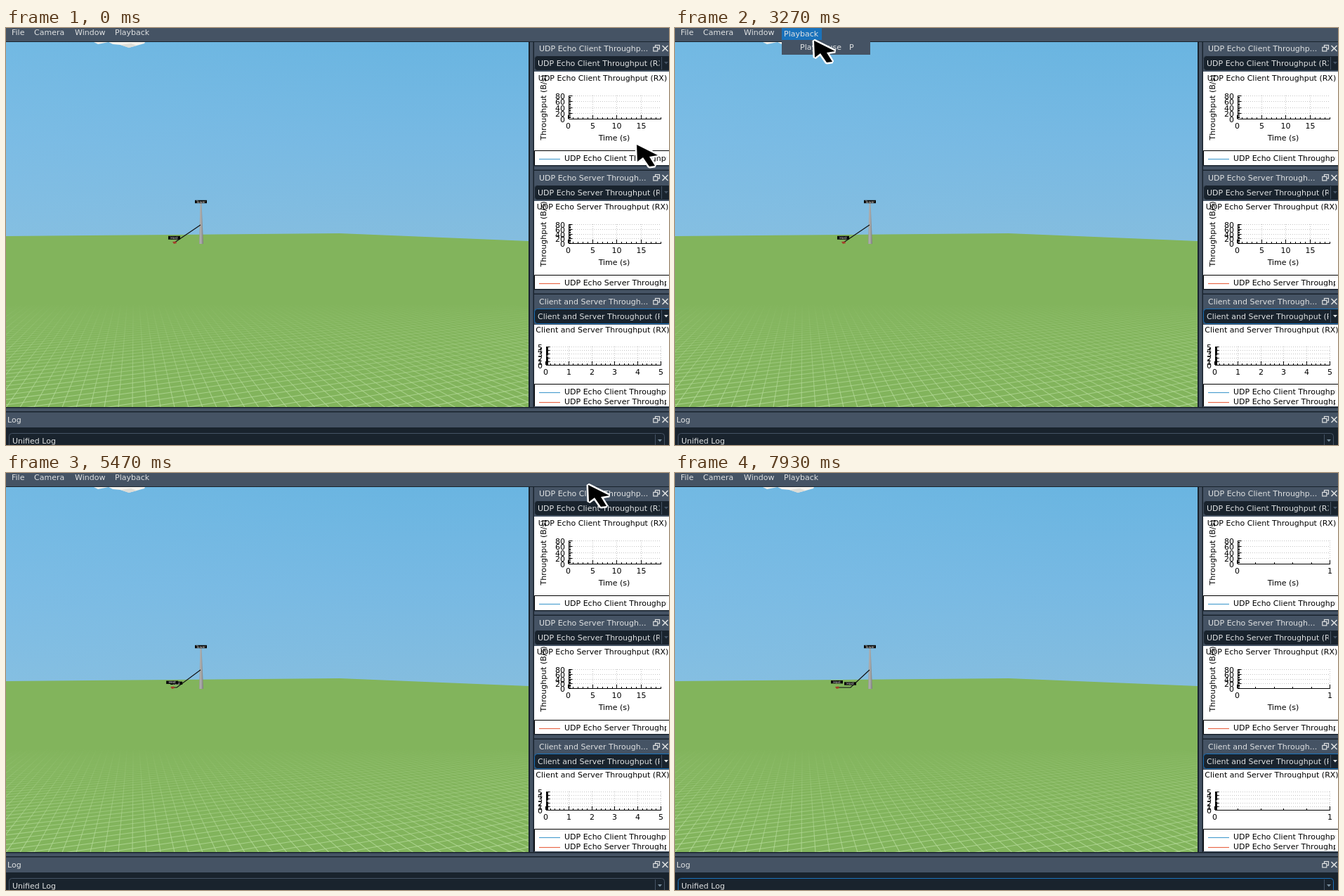
Animation, 944 px wide and 593 px high, one loop 8000 ms. Source, as an HTML page with a canvas:

```html
<!DOCTYPE html>
<html lang="en">
<head>
<meta charset="utf-8">
<title>Network simulation playback</title>
<style>
html, body { margin: 0; width: 100%; height: 100%; overflow: hidden; background: #455364; }
canvas { display: block; }
</style>
</head>
<body>
<canvas id="stage" width="944" height="593"></canvas>
<script>
const PANEL = '#455364', DARK = '#19232d', BLUE = '#1a72bb', LIGHT = '#dfe1e2', DIM = '#788d9c';
const LOOP = 8000, STEP = 200 / 3;
const view = document.getElementById('stage').getContext('2d');
let c = view;

function rect(x, y, w, h, color) {
  c.fillStyle = color;
  c.fillRect(x, y, w, h);
}

function text(s, x, y, color = '#000', align = 'left', size = 11) {
  c.font = size + 'px "DejaVu Sans", sans-serif';
  c.textAlign = align;
  c.fillStyle = color;
  c.fillText(s, x, y);
}

function path(points, close) {
  c.beginPath();
  points.forEach(([x, y]) => c.lineTo(x, y));
  if (close) c.closePath();
}

function poly(points, color) {
  path(points, true);
  c.fillStyle = color;
  c.fill();
}

function line(points, color, width = 1) {
  path(points);
  c.strokeStyle = color;
  c.lineWidth = width;
  c.stroke();
}

function clipped(x, y, w, h, paint) {
  c.save();
  c.beginPath();
  c.rect(x, y, w, h);
  c.clip();
  paint();
  c.restore();
}

function fade(y0, y1, ...colors) {
  const g = c.createLinearGradient(0, y0, 0, y1);
  colors.forEach((color, i) => g.addColorStop(i / (colors.length - 1), color));
  return g;
}

// Ground lines that meet at one vanishing point, evenly spaced along the lower edge
function fan(vx, from, to, gap) {
  const color = fade(392, 539, 'rgba(178,216,150,0)', 'rgba(178,216,150,.42)', 'rgba(178,216,150,.85)');
  for (let x = from; x < to; x += gap) line([[vx, 279.5], [x, 539.5]], color, 1.1);
}

function scene() {
  rect(0, 20, 744, 290, fade(20, 300, '#6ab5e1', '#77b9e3', '#84bddf'));
  const side = c.createLinearGradient(0, 0, 744, 0);
  side.addColorStop(0, 'rgba(135,195,232,.28)');
  side.addColorStop(.75, 'rgba(135,195,232,0)');
  rect(0, 20, 744, 290, side);
  poly([[125, 20], [131, 23], [146, 20], [152, 23], [163, 24], [175, 28], [197, 22], [198, 20]], '#f4f3ee');
  poly([[163, 24], [175, 28], [186, 25], [178, 22]], '#dcdcd6');
  poly([[0, 296], [475, 292], [744, 303], [744, 539], [0, 539]], '#82b45c');
  clipped(0, 385, 744, 154, () => {
    fan(182, -220, 1420, 20);
    fan(1900, -2300, 800, 56.8);
  });
  const steel = c.createLinearGradient(274, 0, 281, 0);
  steel.addColorStop(0, '#8d8d8d');
  steel.addColorStop(.45, '#b0b0b0');
  steel.addColorStop(1, '#7c7c7c');
  poly([[276.5, 249], [278.5, 249], [281, 307], [275, 307]], steel);
  tag(277.5, 247, 'Tower');
}

function tag(x, y, label) {
  rect(x - 8.5, y - 2.2, 17, 4.4, '#080808');
  text(label, x, y + 1.7, '#eee', 'center', 4.6);
}

function dockTitle(label, x, y) {
  text(label, x, y + 4, LIGHT);
  c.strokeStyle = LIGHT;
  c.lineWidth = 1.2;
  c.strokeRect(924.5, y - 4.5, 6, 5.5);
  rect(921, y - 2, 7, 6.5, PANEL);
  c.strokeRect(921.8, y - 1.6, 6, 5.5);
  line([[934.5, y - 4], [942.5, y + 4]], LIGHT, 1.6);
  line([[942.5, y - 4], [934.5, y + 4]], LIGHT, 1.6);
}

function combo(label, x, y, w, border, arrow, arrowX) {
  c.beginPath();
  c.roundRect(x + .5, y + .5, w, 21, 4);
  c.fillStyle = DARK;
  c.fill();
  c.strokeStyle = border;
  c.lineWidth = 1;
  c.stroke();
  const split = Math.min(arrowX - 6.5, 933.5);
  line([[split, y + 2], [split, y + 20]], PANEL);
  poly([[arrowX - 3, y + 9], [arrowX + 3, y + 9], [arrowX, y + 12.5]], arrow);
  clipped(x, y, split - x - 3, 22, () => text(label, x + 5, y + 15, LIGHT));
}

// Axes with ticks and dotted grid
function plot(left, top, bottom, xMax, xMajor, xMinor, yMax, yMajor) {
  const right = 933, px = v => Math.round(left + v / xMax * (right - left)) - .5;
  const py = v => Math.round(bottom - v / yMax * (bottom - top)) + .5;
  c.setLineDash([1, 2]);
  for (let v = xMajor; v <= xMax; v += xMajor) line([[px(v), top], [px(v), bottom]], '#c4c4c4');
  for (let v = yMajor; v <= yMax; v += yMajor) line([[left, py(v)], [right, py(v)]], '#c4c4c4');
  c.setLineDash([]);
  line([[left + .5, top], [left + .5, bottom + 1]], '#000');
  line([[left, bottom + .5], [right, bottom + .5]], '#000');
  for (let v = 0; v <= xMax + .01; v += xMinor) line([[px(v), bottom], [px(v), bottom - 2]], '#000');
  for (let v = 0; v <= xMax; v += xMajor) {
    line([[px(v), bottom], [px(v), bottom - 5]], '#000');
    text(v, px(v), bottom + 14, '#000', 'center');
  }
  for (let v = 0; v <= yMax; v += yMajor / 5) line([[left, py(v)], [left + 3, py(v)]], '#000');
  for (let v = 0; v <= yMax; v += yMajor) {
    line([[left, py(v)], [left + 5.5, py(v)]], '#000');
    text(v, left - 5, py(v) + 4, '#000', 'right');
  }
}

function legend(top, bottom, rows) {
  rect(752, top, 192, bottom - top, '#fff');
  line([[944, top + .5], [752.5, top + .5], [752.5, bottom]], '#000');
  rows.forEach(([label, color, y, depth]) => {
    line([[759, y - 2.5], [789, y - 2.5]], color, 1.2);
    clipped(795, y - 12, 145.5, 12 + depth, () => text(label, 795, y));
  });
}

const CLIENT = 'UDP Echo Client Throughput (RX)', SERVER = 'UDP Echo Server Throughput (RX)';
const SKY = '#4c9fcf', RED = '#e8694a';
const docks = [
  { title: 'UDP Echo Client Throughp...', name: CLIENT, y: 29, head: 75, cut: 4, end: 195, axis: [96, 129],
    mid: 113, legend: 174, rows: [[CLIENT, SKY, 189, 4]], switchAt: 98 },
  { title: 'UDP Echo Server Through...', name: SERVER, y: 213, head: 258, cut: 1.5, end: 371, axis: [279, 306],
    mid: 293, legend: 351, rows: [[SERVER, RED, 366, 1.5]], switchAt: 95 },
  { title: 'Client and Server Through...', name: 'Client and Server Throughput (RX)', y: 389, head: 433, cut: 1.5,
    end: 538, axis: [453, 479], legend: 506, rows: [[CLIENT, SKY, 521, 1.5], [SERVER, RED, 535, 1.5]],
    switchAt: 98, both: true }
];

function dock(d, k) {
  const [top, bottom] = d.axis, short = k >= d.switchAt;
  dockTitle(d.title, 759, d.y);
  combo(d.name, 752, d.y + 10, 196, d.both ? BLUE : PANEL, d.both ? LIGHT : PANEL, 940);
  rect(752, d.y + 33, 192, d.end - d.y - 33, '#fff');
  clipped(752, d.head - 13, 192, 13 + d.cut, () => text(d.name, 849.5, d.head, '#000', 'center'));
  if (d.both) {
    plot(769, top, bottom, short ? 1 : 5, 1, .2, 5, 1);
  } else {
    plot(801, top, bottom, short ? 1 : 19, short ? 1 : 5, short ? .2 : 1, 80, 20);
    text('Time (s)', 866, bottom + 31, '#000', 'center');
    c.save();
    c.translate(769, d.mid);
    c.rotate(-Math.PI / 2);
    text('Throughput (B/s)', 0, 0, '#000', 'center');
    c.restore();
  }
  legend(d.legend, d.end, d.rows);
}

function frame() {
  rect(0, 0, 944, 593, PANEL);
  scene();
  rect(0, 19, 944, 1, DARK);
  [['File', 8], ['Camera', 40], ['Window', 98], ['Playback', 155]].forEach(([s, x]) => text(s, x, 10, LIGHT));
  rect(744, 20, 2, 520, DARK);
  rect(750.5, 20, 1.5, 520, DARK);
  [195, 201.5, 371, 377.5].forEach(y => rect(751, y, 193, 1.5, DARK));
  rect(0, 539, 944, 1.5, DARK);
  rect(0, 545, 944, 1.5, DARK);
  dockTitle('Log', 2, 557);
  rect(0, 568, 944, 25, DARK);
}

const base = document.createElement('canvas');
base.width = 944;
base.height = 593;
c = base.getContext('2d');
frame();
c = view;

function menu(k) {
  if (k < 31 || k >= 65) return;
  const open = k >= 42;
  rect(152, 0, 57, open ? 19 : 16, BLUE);
  text('Playback', 155, open ? 12 : 10, LIGHT);
  if (!open) return;
  rect(152, 17, 126, 21, k >= 55 ? BLUE : PANEL);
  text('Play/Pause', 178, 31, LIGHT);
  text('P', 248, 31, LIGHT);
}

// The two hosts drift apart in ticks of three steps
function hosts(k) {
  const p = k < 65 ? 0 : (Math.floor((k - 65) / 3) + 1) / 19;
  const a = 240 - 9 * p, b = 240 + 10 * p;
  line([[a, 305], [b, 305], [277, 280]], '#111', 1.2);
  poly([[a - 3, 304], [a + 2, 303.5], [a + 3, 306], [a - 1, 307]], '#a3402a');
  tag(b - .5, 298.5 + p, 'Host');
  tag(a - .5, 298 - p * .8, 'Host');
}

// Pointer runs: each is a list of [step, x, y], visible from first to last step
const runs = [
  [[0, 895, 163], [1, 846, 43]],
  [[19, 280, 0], [28, 191, 12], [48, 191, 12], [53, 209, 26], [55, 208, 26], [64, 208, 26], [70, 324, 0]],
  [[80, 790, 5], [82, 826, 14], [83, 858, 18], [84, 858, 18], [89, 922, 39], [94, 922, 39], [95, 932, 100],
    [96, 940, 177], [101, 925, 400], [105, 895, 580]]
];

function pointer(k) {
  const run = runs.find(r => k >= r[0][0] && k <= r[r.length - 1][0]);
  if (!run) return;
  const i = Math.max(1, run.findIndex(p => p[0] >= k));
  const [k0, x0, y0] = run[i - 1], [k1, x1, y1] = run[i], f = (k - k0) / (k1 - k0);
  c.save();
  c.translate(Math.round(x0 + (x1 - x0) * f), Math.round(y0 + (y1 - y0) * f));
  const shape = [[3, 3], [4, 27], [12, 21], [21, 34], [29, 33], [21, 20], [33, 18]];
  path(shape, true);
  c.lineJoin = 'bevel';
  c.strokeStyle = '#fff';
  c.lineWidth = 5;
  c.stroke();
  poly(shape, '#000');
  c.restore();
}

function draw(now) {
  const k = Math.floor((now % LOOP + 5) / STEP);
  c.drawImage(base, 0, 0);
  hosts(k);
  docks.forEach(d => dock(d, k));
  const lit = k === 109 || k >= 112;
  combo('Unified Log', 4, 576, 933, lit ? BLUE : PANEL, DIM, 931);
  menu(k);
  pointer(k);
}

const start = performance.now();
function tick() {
  draw(performance.now() - start);
  requestAnimationFrame(tick);
}
tick();
</script>
</body>
</html>
```
